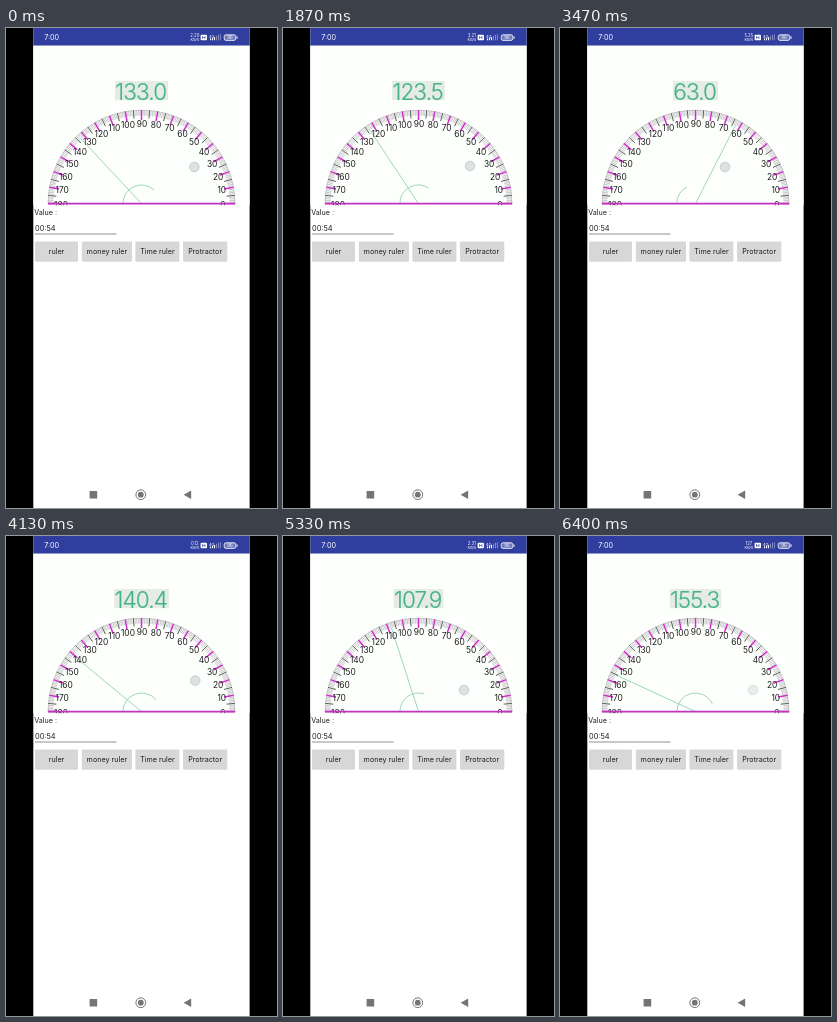
Animation, 271 px wide and 480 px high, one loop 6470 ms. Source, as an HTML page:

```html
<!DOCTYPE html>
<html lang="en">
<head>
<meta charset="utf-8">
<title>Protractor</title>
<style>
  html, body { margin: 0; width: 100%; height: 100%; overflow: hidden; background: #000; }
  svg { display: block; width: 100vw; height: 100vh; }
  text { font: 7.2px Inter, Roboto, sans-serif; fill: #1c1c1c; }
  .mid { text-anchor: middle; }
  .bar text { fill: #fff; }
  #scale text { font-size: 8.4px; }
  #reading { font-size: 22.6px; font-weight: 300; letter-spacing: -.9px; fill: #45b389; stroke: #45b389; stroke-width: .2; }
</style>
</head>
<body>
<svg viewBox="0 0 271 480">
  <clipPath id="view"><rect x="27.3" y="17.7" width="216.3" height="159.6"/></clipPath>
  <rect width="271" height="480"/>
  <rect x="27.3" width="216.3" height="480" fill="#fff"/>
  <rect x="27.3" width="216.3" height="17.7" fill="#303f9f"/>

  <g class="bar">
    <text x="38.2" y="12.2" style="font-size:7.2px">7:00</text>
    <g style="font-weight:700">
      <text id="speed" class="mid" x="188.8" y="9.2" style="font-size:4.3px"></text>
      <text class="mid" x="188.8" y="12.8" style="font-size:3.8px">KB/s</text>
      <text x="203" y="9.6" style="font-size:4px">4G</text>
    </g>
    <rect x="194.6" y="6.7" width="6.4" height="5.6" rx="1" fill="#fff"/>
    <path d="M196.5 8v3M199 8v3M196.5 9.5h2.5" stroke="#303f9f" stroke-width=".6"/>
    <path d="M204.5 12.3v-1.8M206.5 12.3v-2.4M208.5 12.3v-3.4" stroke="#fff" stroke-width="1.1"/>
    <path d="M210.5 12.3v-4.6M212.5 12.3v-5.6M214.4 12.3v-6" stroke="#fff" stroke-opacity=".4"/>
    <rect x="218.2" y="6.8" width="11.6" height="5.6" rx="1.8" fill="#fff" fill-opacity=".3" stroke="#fff" stroke-width=".8"/>
    <path d="M231 8.4v2.4" stroke="#fff"/>
    <text class="mid" x="224" y="11.2" style="font-size:4.5px">96</text>
  </g>

  <g clip-path="url(#view)">
    <rect x="27" y="17" width="217" height="161" fill="#fdfffc"/>
    <rect id="box" y="53" height="19.2" fill="#e6ebe7"/>
    <text id="reading" class="mid" x="134.7" y="71.6"></text>
    <g fill="none" stroke="#86c9b0" stroke-width=".8">
      <path id="hand"/>
      <path id="sweep"/>
    </g>
    <g id="scale"></g>
    <path d="M42 175.6H229.2" stroke="#c233bf" stroke-width="1.7"/>
  </g>

  <text x="28.2" y="186.5">Value :</text>
  <text x="29" y="202.8" style="font-size:7.4px">00:54</text>
  <path d="M29 206H110.5" stroke="#777" stroke-width=".8"/>
  <g id="buttons"></g>
  <circle id="touch" r="4.8" fill="#dfe1e3" stroke="#bcbfc1" stroke-width=".7"/>

  <g fill="#747474">
    <rect x="83.6" y="463" width="7.6" height="7.6" rx=".6"/>
    <circle cx="134.8" cy="466.7" r="2.9"/>
    <circle cx="134.8" cy="466.7" r="4.9" fill="none" stroke="#747474"/>
    <path d="M177.6 466.7L185.2 462.5V470.9Z"/>
  </g>
</svg>
<script>
const LOOP = 6470, STEP = 200 / 3, CX = 135.5, CY = 175.6;
const $ = id => document.getElementById(id);

function add(parent, tag, attrs, label = '') {
  const el = document.createElementNS('http://www.w3.org/2000/svg', tag);
  for (const key in attrs) el.setAttribute(key, attrs[key]);
  el.textContent = label;
  $(parent).append(el);
  return el;
}

function polar(deg, r) {
  const a = deg * Math.PI / 180;
  return [CX + r * Math.cos(a), CY - r * Math.sin(a)];
}

add('scale', 'path', {
  d: `M${polar(180, 93.4)}A93.4 93.4 0 0 1 ${polar(0, 93.4)}`,
  fill: 'none', stroke: '#b5b0b5', 'stroke-width': .6
});
for (let deg = 0; deg <= 180; deg++) {
  const ten = deg % 10 === 0, five = deg % 5 === 0;
  const inner = ten ? 83.7 : five ? 85.5 : 88;
  add('scale', 'path', {
    d: `M${polar(deg, inner)}L${polar(deg, 93.6)}`,
    stroke: ten ? '#cc2fca' : five ? '#3d4a42' : '#aaa5ab',
    'stroke-width': ten ? 1.5 : five ? .9 : .6
  });
  if (ten) {
    const [x, y] = polar(deg, 81);
    add('scale', 'text', { x: x + .5, y: y + 3.9, class: 'mid' }, deg);
  }
}

[['ruler', 29, 43], ['money ruler', 75.8, 50.2], ['Time ruler', 129.4, 44], ['Protractor', 177, 44.3]]
  .forEach(([label, x, width]) => {
    add('buttons', 'rect', { x, y: 213.4, width, height: 20.4, rx: 1.2, fill: '#d6d7d6' });
    add('buttons', 'text', { x: x + width / 2, y: 226.2, class: 'mid' }, label);
  });

// time, angle, touch x, touch y
const drag = [
  [1200, 50, 161, 138], [1600, 50, 161, 138], [1867, 123.5, 187, 138], [2270, 146, 192, 138],
  [2600, 138, 189, 139], [3270, 63, 165, 139], [3467, 63, 165, 139], [3950, 142, 190, 143],
  [4200, 140, 189, 145], [4667, 61.1, 164, 148], [4800, 61.1, 164, 149],
  [5333, 107.9, 181, 154], [5900, 152, 192, 154], [6400, 155.3, 193, 154]
];

function along(t) {
  const i = drag.findIndex(k => k[0] >= t);
  if (i < 0) return drag[drag.length - 1].slice(1);
  if (!i) return drag[0].slice(1);
  const a = drag[i - 1], b = drag[i];
  const p = (t - a[0]) / (b[0] - a[0]), e = (p + p * p * (3 - 2 * p)) / 2;
  return [1, 2, 3].map(n => a[n] + (b[n] - a[n]) * e);
}

function pose(t) {
  if (t < 66) return [133, 188.3, 139, 1];
  if (t < 870) return [50, 199.5, 223, t >= 399 && t < 730 ? .35 : 0];
  const fade = t > 6390 ? .6 : Math.min(1, (t - 870) / 330);
  return [...along(t), fade];
}

const speeds = [[6130, '127'], [5300, '2.31'], [4130, '0.12'], [3270, '5.25'], [1600, '3.21'], [66, '0.00'], [0, '2.20']];

function draw(now) {
  const t = Math.floor((now % LOOP + 4) / STEP) * STEP;
  const [angle, x, y, alpha] = pose(t);
  const reading = $('reading'), touch = $('touch'), box = $('box');
  reading.textContent = angle.toFixed(1);
  const width = reading.getComputedTextLength() + 2;
  box.setAttribute('x', CX - width / 2);
  box.setAttribute('width', width);
  $('hand').setAttribute('d', `M${CX} ${CY}L${polar(angle, 88)}`);
  $('sweep').setAttribute('d', `M${polar(180, 18.6)}A18.6 18.6 0 0 1 ${polar(180 - angle, 18.6)}`);
  touch.setAttribute('cx', x);
  touch.setAttribute('cy', y);
  touch.setAttribute('opacity', alpha);
  $('speed').textContent = speeds.find(s => t >= s[0])[1];
  requestAnimationFrame(() => draw(performance.now()));
}
draw(0);
</script>
</body>
</html>
```
